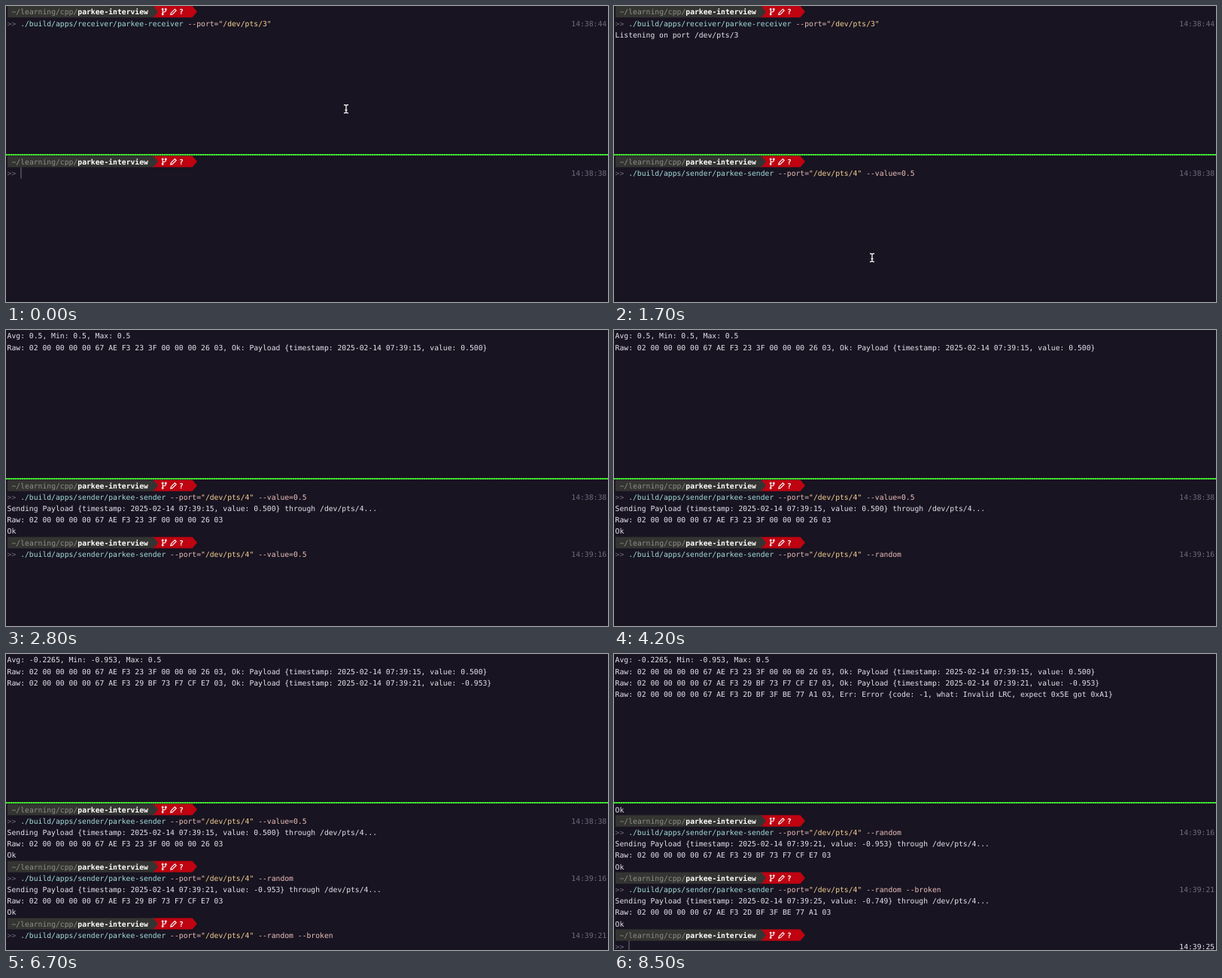
An HTML page for the animation above (8.8 s loop, 800x394 px).

```html
<!DOCTYPE html>
<html lang="en">
<head>
<meta charset="utf-8">
<title>Serial sender and receiver</title>
<style>
  html, body { margin: 0; width: 100%; height: 100%; overflow: hidden; background: #181421; }
  svg { display: block; width: 100vw; height: 100vh; }
  text {
    font: 9.73px "DejaVu Sans Mono", "Noto Sans Mono", monospace;
    white-space: pre; text-rendering: geometricPrecision; fill: #e6e3ee;
  }
  .dim { fill: #6f6b80; }
  .path { fill: #8f8e88; }
  .cmd { fill: #a3dcdc; }
  .opt { fill: #ebbfbc; }
  .str { fill: #f4cf92; }
  .bold { fill: #fff; font-weight: bold; }
</style>
</head>
<body>
<svg viewBox="0 0 800 394" preserveAspectRatio="none">
  <defs>
    <g id="prompt">
      <path d="M194 0H247.6L254 7.6L247.6 15.2H194Z" fill="#bf0311"/>
      <path d="M2 0H196L202 7.6L196 15.2H2Z" fill="#343432"/>
      <g fill="none" stroke="#fff" stroke-width="1.1">
        <path d="M208.2 4.8V10.6M212.3 5.6V6.6Q212.3 8 208.4 8.4"/>
        <circle cx="208.2" cy="4.5" r=".9"/>
        <circle cx="212.3" cy="4.5" r=".9"/>
        <circle cx="208.2" cy="11" r=".9"/>
        <path d="M218.8 11.6L219.4 9.2L224.4 4.2L226.2 6L221.2 11Z"/>
      </g>
      <text x="7.5" y="11.3"><tspan class="path">~/learning/cpp/</tspan><tspan class="bold">parkee-interview</tspan></text>
      <text x="230" y="11.3" class="bold">?</text>
    </g>
  </defs>
  <rect width="800" height="394" fill="#181421"/>
  <g id="top"></g>
  <g id="bottom" transform="translate(0 199.4)"></g>
  <path d="M0 198H800" stroke="#27b91f" stroke-width="2.2"/>
  <path d="M0 198H800" stroke="#55f542" stroke-width="1.6" stroke-dasharray="2 1"/>
  <g id="mouse" fill="none">
    <path id="beam" d="M-3 -5.5Q0 -5.5 0 -4Q0 -5.5 3 -5.5M0 -4V4M-3 5.5Q0 5.5 0 4Q0 5.5 3 5.5M-1.5 1.5H1.5" stroke="#f4f4f4" stroke-width="1.3"/>
  </g>
</svg>
<script>
const LOOP = 8800, CELL = 5.857, ROW = 15.2, LEFT = 1.6, VISIBLE_ROWS = 13;
const LISTEN = 200, RUN = [2000, 4600, 7000];
const $ = id => document.getElementById(id);
const clamp = v => Math.max(0, Math.min(1, v));
const column = n => LEFT + n * CELL;

const head = "02 00 00 00 00 67 AE F3 ";
const records = [
  { time: "07:39:15", value: "0.500", bytes: head + "23 3F 00 00 00 26 03" },
  { time: "07:39:21", value: "-0.953", bytes: head + "29 BF 73 F7 CF E7 03" },
  { time: "07:39:25", value: "-0.749", bytes: head + "2D BF 3F BE 77 A1 03" }
];
const payload = r => `Payload {timestamp: 2025-02-14 ${r.time}, value: ${r.value}}`;
const results = [
  "Ok: " + payload(records[0]),
  "Ok: " + payload(records[1]),
  "Err: Error {code: -1, what: Invalid LRC, expect 0x5E got 0xA1}"
];
const clocks = ["14:38:38", "14:39:16", "14:39:21", "14:39:25"];

const receiver = './build/apps/receiver/parkee-receiver --port="/dev/pts/3"';
const base = './build/apps/sender/parkee-sender --port="/dev/pts/4" ';
const typed = (s, t, start, step) => s.slice(0, Math.max(0, Math.floor((t - start) / step) + 1));

// Text on each of the sender's input lines at time t.
const inputs = [
  t => t < 1400 ? "" : base + "--value=0.5",
  t => t < 2500 ? "" : base + (t < 3100 ? "--value=0.5" : typed("--random", t, 3400, 50)),
  t => t < 5300 ? "" : base + "--random" + typed(" --broken", t, 5600, 70),
  () => ""
];
const caretSpans = [[1400, 1700], [2500, 2700], [3100, 4000], [5300, 6400]];

const text = (row, content, x = LEFT, cls = "") =>
  `<text x="${x}" y="${11.3 + row * ROW}" class="${cls}">${content}</text>`;
const prompt = row => `<use href="#prompt" y="${row * ROW}"/>`;

function colored(command) {
  const [program, ...args] = command.split(" ");
  const rest = args.map(a => " " + a).join("").replace(/"[^"]*"/, s => `<tspan class="str">${s}</tspan>`);
  return `<tspan class="cmd">${program}</tspan><tspan class="opt">${rest}</tspan>`;
}

function inputLine(row, command, clock, caret, bright) {
  const x = column(3 + command.length) + .8;
  return text(row, "&gt;&gt;", LEFT, "dim")
    + (command ? text(row, colored(command), column(3)) : "")
    + text(row, clock, column(128), bright ? "" : "dim")
    + (caret ? `<path d="M${x} ${row * ROW}v15.2" stroke="#77738a"/>` : "");
}

function topPane(t, runs) {
  if (!runs) {
    return prompt(0) + inputLine(1, receiver, "14:38:44")
      + (t >= LISTEN ? text(2, "Listening on port /dev/pts/3") : "");
  }
  const stats = runs === 1 ? "Avg: 0.5, Min: 0.5, Max: 0.5" : "Avg: -0.2265, Min: -0.953, Max: 0.5";
  return text(0, stats) + records.slice(0, runs)
    .map((r, i) => text(i + 1, `Raw: ${r.bytes}, ${results[i]}`)).join("");
}

function bottomPane(t, runs) {
  const lines = [];
  const caretOn = caretSpans.some(([a, b]) => t >= a && t < b);
  for (let i = 0; i <= runs; i++) {
    const command = inputs[i](t), active = i === runs;
    lines.push(prompt, row =>
      inputLine(row, command, clocks[i], active && (!command || caretOn), i === 3));
    if (!active) {
      const r = records[i];
      lines.push(
        row => text(row, `Sending ${payload(r)} through /dev/pts/4...`),
        row => text(row, "Raw: " + r.bytes),
        row => text(row, "Ok"));
    }
  }
  return lines.slice(-VISIBLE_ROWS).map((draw, row) => draw(row)).join("");
}

function placeMouse(t) {
  const p = clamp((t - 300) / 600), ease = p * p * (3 - 2 * p);
  const settle = clamp((t - 900) / 200);
  const x = 452 - 109 * ease, y = 137 + 208 * ease - 10 * settle;
  $("mouse").setAttribute("transform", `translate(${x} ${y})`);
  $("mouse").style.display = t < RUN[0] ? "" : "none";
}

let shown = { top: "", bottom: "" };
function update(id, markup) {
  if (shown[id] !== markup) $(id).innerHTML = shown[id] = markup;
}

function render(t) {
  const runs = RUN.filter(start => t >= start).length;
  update("top", topPane(t, runs));
  update("bottom", bottomPane(t, runs));
  placeMouse(t);
}

const start = performance.now();
function tick() {
  render((performance.now() - start) % LOOP);
  requestAnimationFrame(tick);
}
tick();
</script>
</body>
</html>
```
